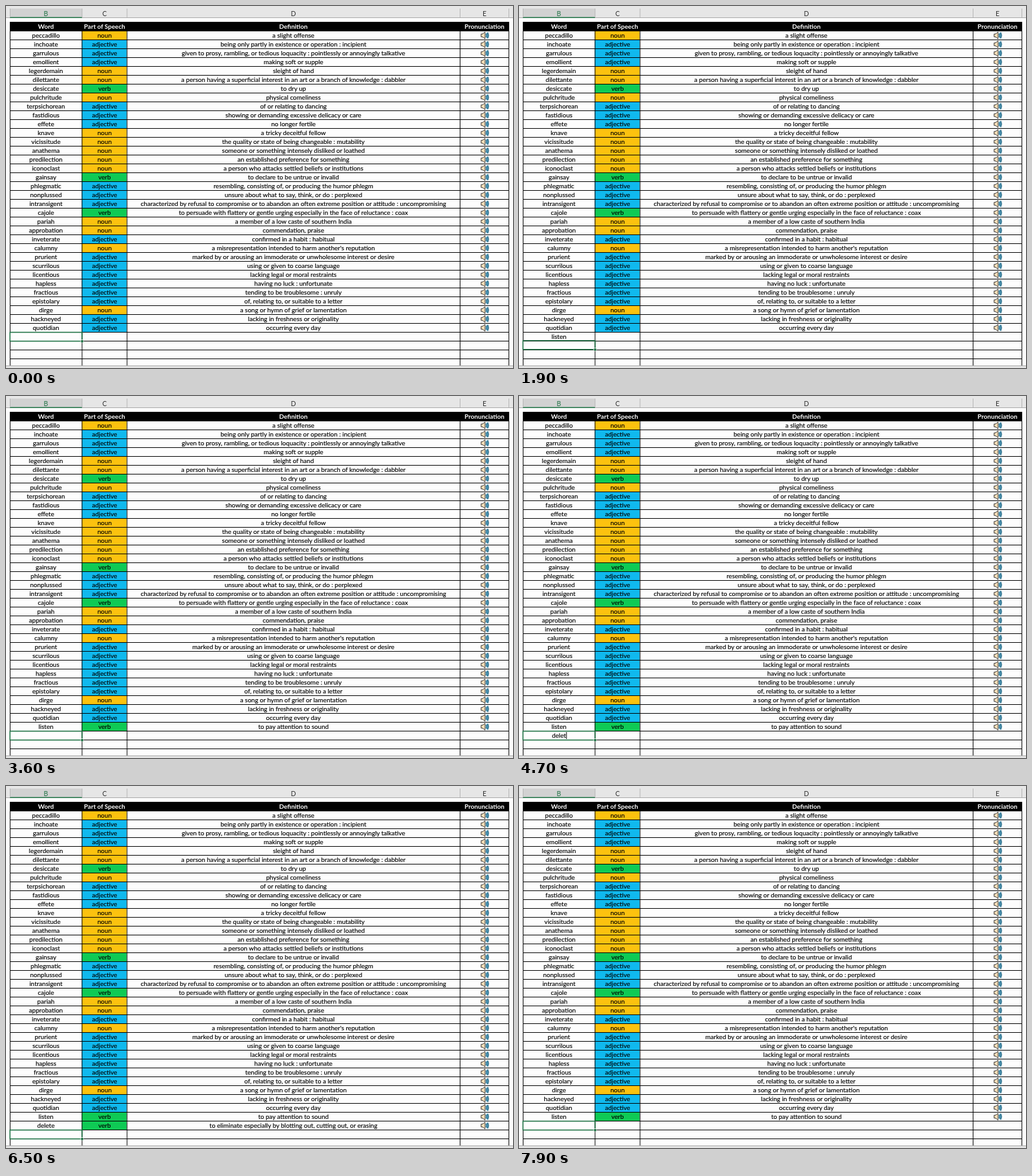
These frames come from a looping animation (800 px wide and 572 px high, 8 s). An HTML page:

```html
<!DOCTYPE html>
<html lang="en">
<head>
<meta charset="utf-8">
<title>Vocabulary sheet</title>
<style>
html, body { margin: 0; width: 100%; height: 100%; overflow: hidden; background: #fdfdfd; }
svg { display: block; width: 800px; height: 572px; }
text { font: 10.05px Lato, sans-serif; text-anchor: middle; fill: #000; stroke: #000; stroke-width: .15; }
.head { font-weight: 700; fill: #fff; stroke: none; }
.letter { font-size: 10.5px; stroke: none; }
</style>
</head>
<body>
<svg id="stage" viewBox="0 0 800 572"></svg>
<script>
const LOOP = 8000, ROW = 14, TOP = 39;
const EDGES = [6, 119.5, 190.5, 716, 793];
const CENTERS = [63, 155.5, 453.5, 755];
const GREEN = '#217346';
const KINDS = {
  n: ['noun', '#fcc20f'],
  a: ['adjective', '#10b9ee'],
  v: ['verb', '#0fca55']
};
const WORDS = `peccadillo|n|a slight offense
inchoate|a|being only partly in existence or operation : incipient
garrulous|a|given to prosy, rambling, or tedious loquacity : pointlessly or annoyingly talkative
emollient|a|making soft or supple
legerdemain|n|sleight of hand
dilettante|n|a person having a superficial interest in an art or a branch of knowledge : dabbler
desiccate|v|to dry up
pulchritude|n|physical comeliness
terpsichorean|a|of or relating to dancing
fastidious|a|showing or demanding excessive delicacy or care
effete|a|no longer fertile
knave|n|a tricky deceitful fellow
vicissitude|n|the quality or state of being changeable : mutability
anathema|n|someone or something intensely disliked or loathed
predilection|n|an established preference for something
iconoclast|n|a person who attacks settled beliefs or institutions
gainsay|v|to declare to be untrue or invalid
phlegmatic|a|resembling, consisting of, or producing the humor phlegm
nonplussed|a|unsure about what to say, think, or do : perplexed
intransigent|a|characterized by refusal to compromise or to abandon an often extreme position or attitude : uncompromising
cajole|v|to persuade with flattery or gentle urging especially in the face of reluctance : coax
pariah|n|a member of a low caste of southern India
approbation|n|commendation, praise
inveterate|a|confirmed in a habit : habitual
calumny|n|a misrepresentation intended to harm another's reputation
prurient|a|marked by or arousing an immoderate or unwholesome interest or desire
scurrilous|a|using or given to coarse language
licentious|a|lacking legal or moral restraints
hapless|a|having no luck : unfortunate
fractious|a|tending to be troublesome : unruly
epistolary|a|of, relating to, or suitable to a letter
dirge|n|a song or hymn of grief or lamentation
hackneyed|a|lacking in freshness or originality
quotidian|a|occurring every day
listen|v|to pay attention to sound
delete|v|to eliminate especially by blotting out, cutting out, or erasing`
  .split('\n').map(line => line.split('|'));

// Times in ms: typing start, time per letter, enter, lookup shown, word cleared, row cleared
const ENTRIES = [
  { row: 34, type: 800, step: 150, enter: 1810, show: 2700, wipe: LOOP, clear: LOOP },
  { row: 35, type: 4050, step: 150, enter: 4910, show: 5600, wipe: 7400, clear: 7600 }
];
const BACK_UP = 6710, SLIDE = 150;

const stage = document.getElementById('stage');

function add(parent, tag, attrs, content) {
  const node = document.createElementNS('http://www.w3.org/2000/svg', tag);
  for (const key in attrs) node.setAttribute(key, attrs[key]);
  if (content) node.textContent = content;
  parent.appendChild(node);
  return node;
}
const rect = (parent, x, y, width, height, fill) => add(parent, 'rect', { x, y, width, height, fill });
const label = (parent, x, y, content, attrs) => add(parent, 'text', { x, y, ...attrs }, content);
const rowTop = row => TOP + ROW * row;

function speaker(parent, y) {
  const g = add(parent, 'g', { transform: `translate(749 ${y + .8})`, 'stroke-linejoin': 'round' });
  add(g, 'path', { d: 'M8 3.6L11 1.6Q14 6.7 11 11.8L8 9.8Z', fill: '#7cc8e6' });
  add(g, 'path', { d: 'M8.4 4.2Q9.6 6.7 8.4 9.2M10 2.8Q11.8 6.7 10 10.6M11.4 1.7Q14 6.7 11.4 11.7',
    fill: 'none', stroke: '#12536f' });
  add(g, 'path', { d: 'M.7 4.4H3L6.9 1.2V12.2L3 9H.7Z', fill: '#f8dfb8', stroke: '#333' });
}

function drawHeaders() {
  rect(stage, 0, 0, 800, 572, '#fdfdfd');
  rect(stage, 0, 0, 800, 18.5, '#e6e6e6');
  rect(stage, 0, 18, 800, 1, '#a9a9a9');
  rect(stage, 6, 4, 114, 14, '#d2d2d2');
  rect(stage, 6, 17.5, 114, 1.5, GREEN);
  EDGES.forEach(x => rect(stage, x, 4, 1, 14, '#b5b5b5'));
  rect(stage, 6, 25, 788, TOP - 25, '#000');
  ['Word', 'Part of Speech', 'Definition', 'Pronunciation'].forEach((title, i) => {
    label(stage, CENTERS[i], 15.5, 'BCDE'[i], { class: 'letter', style: `fill:${i ? '#333' : GREEN}` });
    label(stage, CENTERS[i], 36, title, { class: 'head' });
  });
}

// Adds a row and returns its word and its looked-up cells
function drawRow([word, kind, definition], row) {
  const y = rowTop(row), base = y + 11, [name, color] = KINDS[kind];
  const details = add(stage, 'g');
  rect(details, EDGES[1], y, EDGES[2] - EDGES[1], ROW, color);
  label(details, CENTERS[1], base, name);
  label(details, CENTERS[2], base, definition);
  speaker(details, y);
  return { word: label(stage, CENTERS[0], base, word), details };
}

drawHeaders();
const rows = WORDS.map(drawRow);
for (let row = 0; row <= 37; row++) rect(stage, 6, rowTop(row), 788, 1, '#000');
EDGES.forEach(x => rect(stage, x, 25, 1, 543, '#000'));
rect(stage, 0, 568, 800, 4, '#e3e3e3');
rect(stage, 0, 568, 800, 1, '#ababab');

const selection = add(stage, 'g');
add(selection, 'rect', { x: 6.3, y: .6, width: 113.7, height: 14, fill: 'none', stroke: GREEN, 'stroke-width': 1.6 });
rect(selection, 117.5, 12.2, 5, 5, '#fdfdfd');
rect(selection, 118.3, 13, 3.6, 3.6, GREEN);
const caret = rect(stage, 0, 0, 1, 11, '#000');

const show = (node, on) => node.setAttribute('visibility', on ? 'visible' : 'hidden');

// Eased progress of a selection move that begins at the given time
function slide(t, begin) {
  const p = Math.min(1, Math.max(0, (t - begin) / SLIDE));
  return 1 - (1 - p) ** 3;
}

function render(t) {
  show(caret, false);
  for (const entry of ENTRIES) {
    const { word, details } = rows[entry.row];
    const full = WORDS[entry.row][0];
    const typed = t < entry.type ? 0 : Math.floor((t - entry.type) / entry.step) + 1;
    word.textContent = t < entry.wipe ? full.slice(0, typed) : '';
    show(details, t >= entry.show && t < entry.clear);
    if (typed && t < entry.enter) {
      caret.setAttribute('x', CENTERS[0] + word.getComputedTextLength() / 2 + .3);
      caret.setAttribute('y', rowTop(entry.row) + 2);
      show(caret, true);
    }
  }
  const row = ENTRIES.reduce((sum, entry) => sum + slide(t, entry.enter), 34) - slide(t, BACK_UP);
  selection.setAttribute('transform', `translate(0 ${rowTop(row)})`);
}

const start = performance.now();
function tick() {
  render((performance.now() - start) % LOOP);
  requestAnimationFrame(tick);
}
tick();
</script>
</body>
</html>
```
